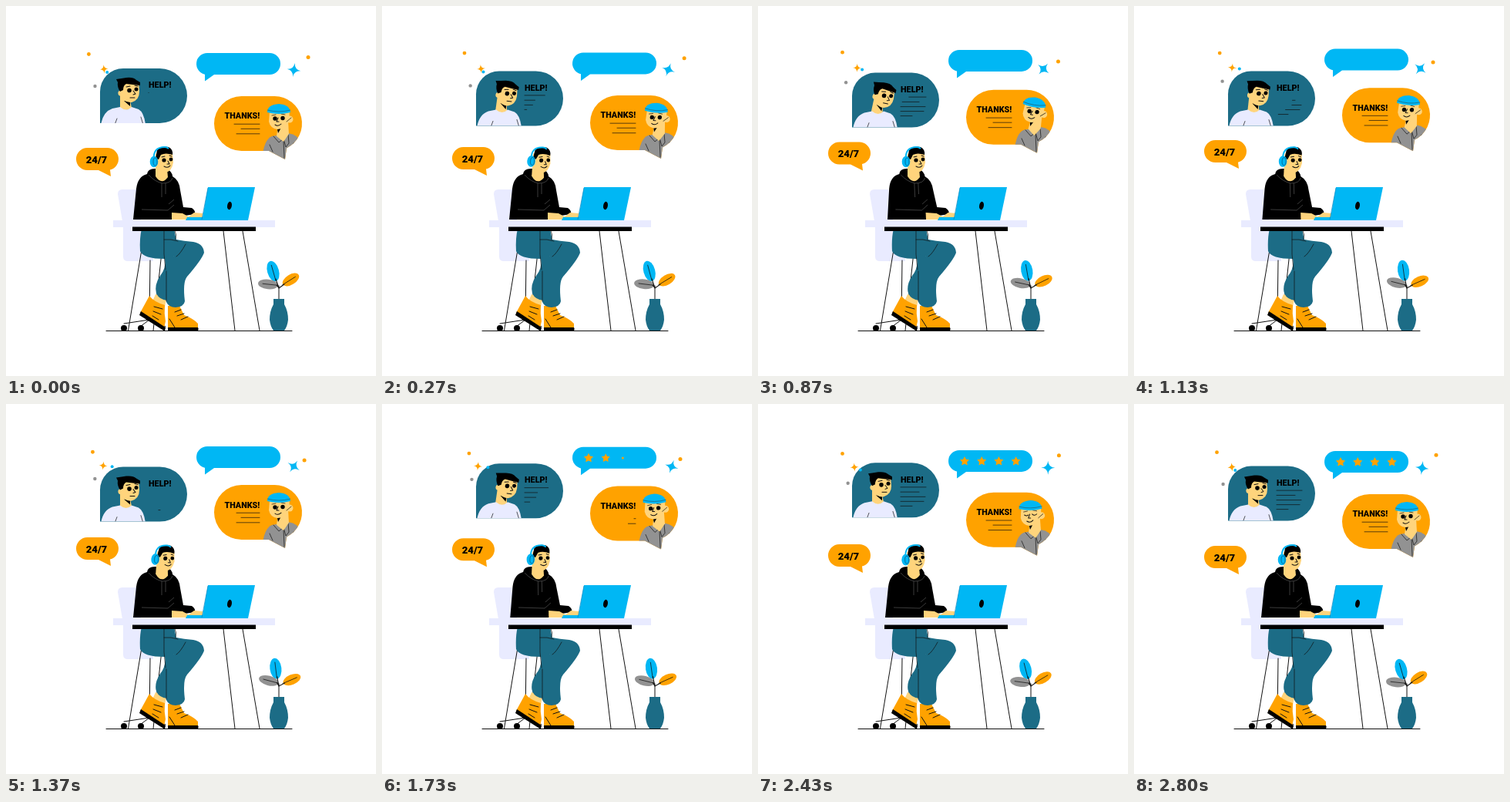
Animation of 480x480 px, one loop 2.83 s. Source, as an HTML page:

```html
<!DOCTYPE html>
<html lang="en">
<head>
<meta charset="utf-8">
<title>Support desk</title>
<style>
  html, body { margin: 0; width: 100%; height: 100%; overflow: hidden; background: #fff; }
  svg { display: block; width: 100vw; height: 100vh; }
  text { font-family: Roboto, Arial, sans-serif; font-weight: 900; fill: #000; }
  .teal { fill: #1c6c86; } .orange { fill: #ffa200; } .sky { fill: #00b7f4; }
  .pale { fill: #e9ebff; } .skin { fill: #ffd47c; } .gray { fill: #929292; }
  .line { fill: none; stroke: #111; stroke-width: 1; stroke-linecap: round; stroke-linejoin: round; }
  .thin { fill: none; stroke: #111; stroke-width: .7; stroke-linecap: round; }
  .seam { fill: none; stroke: #555; stroke-width: .7; }
</style>
</head>
<body>
<svg viewBox="0 0 480 480">
  <defs>
    <path id="helpShape" d="M122 71V30A30 30 0 0 1 152 0H199.500A35.500 35.500 0 0 1 199.500 71Z"/>
    <path id="thanksShape" d="M305.500 0H348.500A35.500 35.500 0 0 1 364 67.440L362 82L341 71H305.500A35.500 35.500 0 0 1 305.500 0Z"/>
    <clipPath id="helpClip"><use href="#helpShape"/></clipPath>
    <clipPath id="thanksClip"><use href="#thanksShape"/></clipPath>
    <path id="spark" d="M0-9Q.6-.6 9 0Q.6.600 0 9Q-.6.600-9 0Q-.6-.6 0-9Z"/>
  </defs>

  <g id="chair">
    <path class="pale" d="M145 244Q145 238 151 238H169L176 285L191 323V331H158Q152 331 152 325V285Z"/>
    <path class="line" d="M180 292L158.500 421M205 292L191 421M187 330L186 407M153 412L186 407L207 416M186 407L174 416"/>
    <circle cx="153" cy="418" r="4"/><circle cx="175" cy="418" r="4"/>
  </g>

  <g id="legs">
    <path class="skin" d="M194 374L208 379L206 391L190 383Z"/>
    <path class="orange" d="M186 376Q192 384 206 388Q205 399 207 409L205 418L174 398Z"/>
    <path d="M175 396L207 417L206 422L173 401Z"/>
    <path class="orange" d="M210 389H225L231 401Q244 406 249 412V418H210Z"/>
    <path d="M210 417H249Q251 421 247 422H210Z"/>
    <path class="line" d="M192 390L203 393M191 396L201 400M190 402L198 407M219 397L227 394M222 402L231 399M227 407L236 403M212 406L219 417"/>
    <path class="teal" d="M176 289H218L221 304L209 382Q199 381 195 373Q192 362 200 350Q208 340 206 328Q178 328 174 318Q173 301 176 289Z"/>
    <path class="teal" d="M204 298Q218 304 243 306Q256 308 257 320Q254 329 235 351Q229 358 232 383Q231 390 220 391Q211 391 208 384L207 342Q208 330 218 324L205 322Z"/>
    <path class="thin" d="M205 290L205 322L207 342M208 344V383M205 303Q214 302 223 305M219 291Q222 297 220 303M233 309Q226 322 221 325"/>
  </g>

  <g id="torso">
    <path d="M165 277L169 237Q171 221 183 218Q184 211 193 211H209Q216 216 216 221Q225 226 226 239L230 261L241 262Q246 265 245 270L232 272L216 277Z"/>
    <path class="skin" d="M215 268L229 269L238 274Q239 277 234 277H215ZM244 268L255 269V274H236Z"/>
    <path class="seam" d="M176 264L210 265L218 258M185 219Q193 228 203 230Q214 230 216 223M202 230V248M207 230V244M211 257L218 251"/>
  </g>
  <g id="agentHead">
    <path class="skin" d="M194 207V221Q202 233 210 222L209 212Z"/>
    <path class="skin" d="M194 192Q207 184 216 191L217 203Q215 214 208 216Q197 216 194 207Z"/>
    <path d="M194 198L196 187Q202 181 211 183Q217 186 216 193Q207 190 201 193L198 199Z"/>
    <circle cx="205" cy="200" r="2.600"/><circle cx="214" cy="199" r="2.400"/>
    <path class="line" d="M210 201L212 205L209 205M205 208Q210 211 213 207M202 196L206 195M212 194L215 195"/>
    <path d="M192 200Q190 183 206 183Q209 183 211 185" fill="none" stroke="#00b7f4" stroke-width="2"/>
    <ellipse class="sky" cx="192" cy="202" rx="5.300" ry="7.300"/>
    <ellipse cx="193.500" cy="202" rx="2.500" ry="5" fill="none" stroke="#075b86" stroke-width=".8"/>
  </g>

  <g id="desk">
    <path class="line" d="M282 292L297 421M307 292L329 421M130 421.500H371"/>
    <path class="pale" d="M139 278H349V287H139Z"/>
    <path d="M164 286.500H324V292H164Z"/>
    <path class="sky" d="M262 235H323L314 278H233L235 274H255Z"/>
    <path d="M262 236L254 277" stroke="#0785bd" stroke-width=".7"/>
    <ellipse cx="290" cy="259" rx="2.900" ry="5.200" transform="rotate(10 290 259)"/>
  </g>

  <g id="plant">
    <path class="line" d="M354 380V363"/>
    <g id="leaves">
      <g transform="translate(346.500 344) rotate(-16)"><ellipse class="sky" rx="7.500" ry="13.500"/><path class="thin" d="M0-8V13"/></g>
      <g transform="translate(369.500 355) rotate(58)"><ellipse class="orange" rx="6.500" ry="12"/><path class="thin" d="M0-7V13"/></g>
      <g transform="translate(340 361) rotate(-84)"><ellipse class="gray" rx="6.300" ry="13"/><path class="thin" d="M0-7V13"/></g>
      <path class="line" d="M350 354L354 366L361 361M351 362L354 366"/>
    </g>
    <path class="teal" d="M347 380H361V387Q366 396 366 407Q365 416 361 421H347Q343 416 342 407Q342 396 347 387Z"/>
  </g>

  <g id="help">
    <use href="#helpShape" class="teal"/>
    <g clip-path="url(#helpClip)">
      <g id="callerHead">
        <path class="skin" d="M148 31V52Q156 57 163 51L161 42Z"/>
        <path d="M153 42L161 49V43Z"/>
        <path class="skin" d="M148 20V33Q152 45 163 44Q173 41 173 30L172 17Z"/>
        <circle class="skin" cx="149" cy="32" r="3.600"/>
        <path d="M148 30Q144 24 145 18L143 14Q150 13 156 12Q165 11 169 15L174 18L174 22Q164 21 156 20Q152 22 152 28L150 29Z"/>
        <circle cx="160" cy="28.500" r="2.800"/><circle cx="169" cy="27" r="2.500"/>
        <path class="line" d="M165 29L168 33L165 34M161 38L167 38M156 24L161 23M167 22L171 23"/>
      </g>
      <path class="pale" d="M123 73Q126 56 138 52L148 50Q156 57 163 50L172 53Q179 57 181 73Z"/>
      <path class="thin" d="M144 65L141 73M175 63L178 73"/>
    </g>
    <text x="185" y="25.200" font-size="10.800">HELP!</text>
    <g id="helpLines"></g>
  </g>

  <g id="rating">
    <path class="sky" d="M261 0H342A14 14 0 0 1 342 28H270L258 36.500V27.670A14 14 0 0 1 261 0Z"/>
    <g id="stars"></g>
  </g>

  <g id="thanks">
    <use href="#thanksShape" class="orange"/>
    <g clip-path="url(#thanksClip)">
      <path class="gray" d="M332 84Q334 56 345 52L366 48Q379 50 384 61V84Z"/>
      <path class="thin" d="M347 52L354 60L360 55L366 49M360 55L363 66L367 61L366 49M342 63L346 72M373 61L369 71M360 57L361 80"/>
    </g>
    <g id="clientHead">
      <path class="skin" d="M353 37L351 52L360 59L367 49L366 32Z"/>
      <path d="M352 43L358 39L353 48Z"/>
      <path class="skin" d="M342 20L341 33Q343 42 352 43Q362 43 367 33L368 18Z"/>
      <circle class="skin" cx="368" cy="30" r="4.500"/>
      <path class="thin" d="M364 33L370 28M345 25L350 24M357 23L362 24"/>
      <path class="sky" d="M339 21Q339 11 354 10Q368 11 369 21Q354 25 339 21Z"/>
      <path d="M339 18Q354 22 369 18" fill="none" stroke="#1c6c86" stroke-width=".8"/>
      <g id="clientEyes"><circle cx="349" cy="29" r="2.700"/><circle cx="359" cy="28.500" r="2.700"/></g>
      <path id="clientLids" class="line" d="M346 29Q349 31 351 29M356 28Q359 31 362 28"/>
      <path class="line" d="M353 28L351 33L354 33M349 37Q353 40 357 36"/>
    </g>
    <text x="283.500" y="29.500" font-size="10.700">THANKS!</text>
    <g id="thanksLines"></g>
  </g>

  <g id="hours">
    <path class="orange" d="M105.500 0H131.500A14.500 14.500 0 0 1 135 28.570L136 37L120 29H105.500A14.500 14.500 0 0 1 105.500 0Z"/>
    <text x="103.700" y="19.700" font-size="13.200">24/7</text>
  </g>

  <circle id="dotLeft" class="orange" r="2.400"/>
  <circle id="dotGray" class="gray" r="2.200"/>
  <circle id="dotBlue" class="sky" r="2"/>
  <circle id="dotRight" class="orange" r="2.500"/>
  <use id="sparkOrange" href="#spark" class="orange"/>
  <use id="sparkBlue" href="#spark" class="sky"/>
</svg>

<script>
const LOOP = 2830;
const LINE_TIME = 340, LINE_GAP = 80;
const SVG_NS = "http://www.w3.org/2000/svg";
const $ = id => document.getElementById(id);
const clamp = v => Math.max(0, Math.min(1, v));
const ease = p => (1 - Math.cos(Math.PI * clamp(p))) / 2;

function add(parent, tag, attrs) {
  const node = document.createElementNS(SVG_NS, tag);
  for (const name in attrs) node.setAttribute(name, attrs[name]);
  return parent.appendChild(node);
}

function place(id, x, y, extra = "") {
  $(id).setAttribute("transform", `translate(${x} ${y}) ${extra}`);
}

function turn(id, angle, x, y) {
  $(id).setAttribute("transform", `rotate(${angle} ${x} ${y})`);
}

// Slides the waist and hands sideways while the shoulders stay put.
function leanTorso(shift) {
  const top = 212, slope = shift / (277 - top);
  $("torso").setAttribute("transform", `matrix(1 0 ${slope} 1 ${-top * slope} 0)`);
}

// Eased value between [time, value] keys.
function track(keys, t) {
  const next = keys.findIndex(key => key[0] > t);
  const [t0, v0] = keys[next - 1], [t1, v1] = keys[next];
  return v0 + (v1 - v0) * ease((t - t0) / (t1 - t0));
}

const agentTilt = [[0, 0], [480, 7], [870, 0], [1300, 4.5], [2070, 1], [2430, -1], [LOOP, 0]];
const lean = [[0, 0], [530, 0], [870, 3], [1370, 0], [2070, 2.5], [2430, 0], [LOOP, 0]];
const callerTilt = [[0, 0], [450, 12], [900, 12], [1370, 0], [1950, 12], [2430, 0], [LOOP, 0]];
const clientTilt = [[0, 0], [600, 9], [870, 9], [1370, 0], [2070, -2], [2430, -1], [LOOP, 0]];
const blinks = [530, 2430];

const makeLines = (id, rows) => rows.map(([from, to, y]) => ({
  from, to, node: add($(id), "line", { y1: y, y2: y, class: "thin" })
}));
const helpLines = makeLines("helpLines",
  [[185, 218, 31.5], [185, 209, 37.8], [185, 217, 44], [185, 215, 50], [185, 200, 56]]);
const thanksLines = makeLines("thanksLines", [[296, 329, 36.2], [305, 329, 42.3], [299, 329, 48.8]]);

const starPoints = Array.from({ length: 10 }, (_, i) => {
  const r = i % 2 ? 3.3 : 6.4, a = i * Math.PI / 5;
  return `${r * Math.sin(a)},${-r * Math.cos(a)}`;
}).join(" ");
const stars = [0, 1, 2, 3].map(() => add($("stars"), "polygon", { points: starPoints, class: "orange" }));

// Lines are written from the left, then wiped from the left.
function writeLines(lines, t, drawAt, wipeAt) {
  lines.forEach(({ from, to, node }, i) => {
    const part = start => clamp((t - start - i * LINE_GAP) / LINE_TIME);
    const head = part(drawAt), tail = part(wipeAt);
    node.setAttribute("x1", from + (to - from) * tail);
    node.setAttribute("x2", from + (to - from) * head);
    node.style.display = head > tail ? "" : "none";
  });
}

function render(t) {
  const phase = 2 * Math.PI * t / LOOP;
  const cos = (deg = 0) => Math.cos(phase + deg * Math.PI / 180);
  const sin = Math.sin(phase);

  place("rating", 0, 58 + 3 * cos());
  place("thanks", 0, 111 + 6 * cos());
  place("hours", 0, 178.5 + 5.5 * cos());
  place("help", 0, 81 + 6 * sin);

  place("dotLeft", 110 - 3 * cos(-30), 62.5 - 2.5 * sin);
  place("dotGray", 115.5 - 1.5 * sin, 100.5 + 3.5 * cos());
  place("dotBlue", 134.5 - 3.3 * cos(-10), 83.7 + 2.4 * cos(10));
  place("dotRight", 389.5 + 2.7 * cos(-20), 69.7 - 3.5 * cos(20));
  place("sparkOrange", 126.5 + 2.5 * cos(-75), 81 + cos(30), `rotate(${-8 * cos()}) scale(.62)`);
  place("sparkBlue", 373.5 - 3.5 * sin, 82 + cos(), `rotate(${20 + 20 * cos(-125)})`);

  turn("leaves", 4.5 * (1 - cos()), 354, 365);
  leanTorso(track(lean, t));
  turn("agentHead", track(agentTilt, t), 201, 223);
  turn("callerHead", track(callerTilt, t), 156, 46);
  turn("clientHead", track(clientTilt, t), 359, 48);

  const shut = blinks.some(at => Math.abs(t - at) < 60);
  $("clientEyes").style.display = shut ? "none" : "";
  $("clientLids").style.display = shut ? "" : "none";

  if (t < LOOP / 2) writeLines(helpLines, t, 0, 760);
  else writeLines(helpLines, t, LOOP / 2, LOOP);
  if (t < 1855) writeLines(thanksLines, t, -LOOP, 1340);
  else writeLines(thanksLines, t, 1860, 2 * LOOP);

  stars.forEach((star, i) => {
    const size = ease((t - 1415 - i * 110) / 250);
    star.setAttribute("transform", `translate(${268 + i * 22.2} 14.4) scale(${size})`);
  });
}

const start = performance.now();
function tick() {
  render((performance.now() - start) % LOOP);
  requestAnimationFrame(tick);
}
render(0);
requestAnimationFrame(tick);
</script>
</body>
</html>
```
